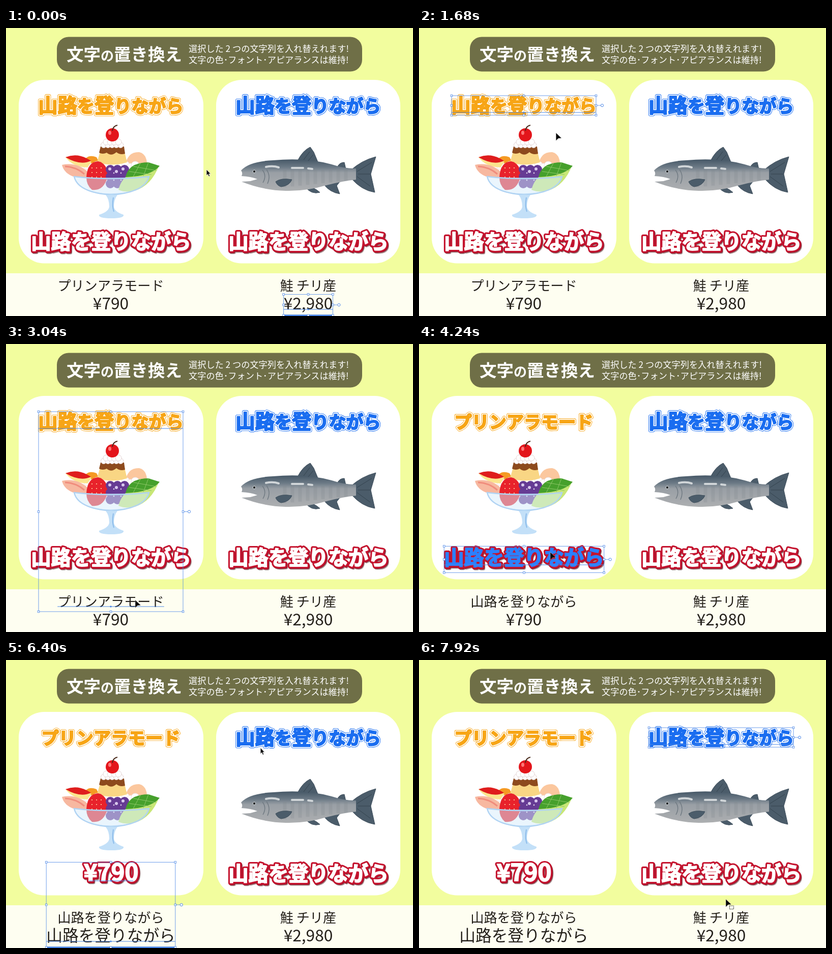
Write an HTML page that moves like this. It is 800x566 px and loops after 8 s.

```html
<!DOCTYPE html>
<html lang="ja">
<head>
<meta charset="utf-8">
<style>
html, body { margin: 0; width: 100%; height: 100%; overflow: hidden; background: #f2fd9e; }
svg { display: block; width: 800px; height: 566px; font-family: "Noto Sans CJK JP", "Noto Sans CJK", sans-serif; }
text { white-space: pre; }
.mid { text-anchor: middle; }
.head { fill: #fff; font-weight: 700; }
.small { font-size: 17.2px; font-weight: 500; }
.thin { fill: #231f1a; font-weight: 350; }
.fat { font-weight: 900; stroke-linejoin: round; }
.fin { fill: #4b5c6a; stroke: #3f4f5c; stroke-linejoin: round; }
</style>
</head>
<body>
<svg viewBox="0 0 800 566">
  <defs>
    <linearGradient id="fish" x1="0" y1="0" x2="0" y2="1">
      <stop offset="0" stop-color="#465867"/><stop offset=".25" stop-color="#6c7a86"/>
      <stop offset=".42" stop-color="#999fa5"/><stop offset="1" stop-color="#adafb1"/>
    </linearGradient>
    <clipPath id="bowl"><path d="M134 294H281Q274 323 207 328Q141 323 134 294Z"/></clipPath>
  </defs>
  <rect width="800" height="566" fill="#f2fd9e"/>
  <rect y="482" width="800" height="84" fill="#fefef1"/>
  <rect x="100" y="17.5" width="600" height="68" rx="23" fill="#6f6f47"/>
  <g class="head">
    <text x="119" y="64" font-size="33.5">文字<tspan font-size="26">の</tspan>置き換え</text>
    <text class="small" x="359" y="47">選択した 2 つの文字列を入れ替えれます!</text>
    <text class="small" x="359" y="69">文字の色･フォント･アピアランスは維持!</text>
  </g>
  <rect x="25" y="102" width="363" height="360.5" rx="50" fill="#fff"/>
  <rect x="413" y="102" width="362" height="360.5" rx="50" fill="#fff"/>

  <g id="parfait">
    <path d="M236 264Q241 243 262 244Q275 247 277 264L262 272Z" fill="#fbc79e"/>
    <path d="M155 258Q163 248 178 254L184 266L162 269Z" fill="#f59a23"/>
    <g id="cream" fill="#fff" stroke="#eee0e2"></g>
    <path d="M117 254Q146 246 168 263L160 274Q131 273 117 254Z" fill="#fbe58e"/>
    <path d="M117 254Q142 244 167 261Q146 271 117 254Z" fill="#df1d1d"/>
    <path d="M110 269Q139 263 160 282V293H135Q114 286 110 269Z" fill="#f7b8a0"/>
    <path d="M116 272Q138 273 154 287" fill="none" stroke="#f08d7d" stroke-width="3"/>
    <path d="M186 239H232L238 264Q209 273 179 264Z" fill="#f9d684"/>
    <path d="M186 233H232L234 247Q224 250 217 244Q207 253 198 245Q190 249 183 245Z" fill="#8d4a1d"/>
    <g id="swirl" fill="#fff" stroke="#e4d3d4"></g>
    <circle cx="209" cy="210" r="13" fill="#e3151b"/>
    <ellipse cx="204" cy="206" rx="3" ry="4" fill="#f77"/>
    <path d="M209 202Q210 193 219 191" fill="none" stroke="#4a2b1c" stroke-width="2"/>
    <path d="M158 293Q160 263 181 262Q200 266 200 292Q192 321 169 318Q158 309 158 293Z" fill="#e8222b"/>
    <g id="seeds" fill="#ffd5a0"></g>
    <g id="grapes" fill="#663b94"></g>
    <path d="M221 318Q227 294 247 285L301 270Q285 311 252 320Q235 324 221 318Z" fill="#c8e777"/>
    <path d="M235 293Q241 264 280 264L302 271Q286 291 235 293Z" fill="#46a02c"/>
    <path d="M242 282L286 288M250 272L295 280M264 266L250 292M280 264L270 291" stroke="#8cc667"/>
    <g clip-path="url(#bowl)">
      <rect x="130" y="293" width="155" height="40" fill="#d6ebfc" opacity=".5"/>
      <path d="M150 318Q207 333 264 317V330H150Z" fill="#a9d2f5" opacity=".6"/>
    </g>
    <path d="M134 292Q207 300 281 292Q273 323 207 328Q141 323 134 292Z" fill="none" stroke="#b0d3f3" stroke-width="2.5"/>
    <path d="M196 328H219Q212 337 212 351Q213 361 231 367Q233 374 207 374Q181 374 183 367Q202 361 203 351Q203 337 196 328Z" fill="#c3e0f8"/>
    <path d="M211 333Q208 350 212 361" fill="none" stroke="#8bbbea" stroke-width="2"/>
  </g>

  <g id="salmon">
    <g class="fin">
      <path d="M573 261Q583 241 598 234L605 244L615 268Z"/>
      <path d="M652 272Q656 264 665 264L668 277Z"/>
      <path d="M677 280Q699 260 727 253L717 287L725 323Q699 319 679 296Z"/>
      <path d="M588 312Q604 311 617 323Q600 328 588 312Z"/>
      <path d="M625 308L657 301L650 310L656 326Q637 323 625 308Z"/>
    </g>
    <path d="M462 280Q478 262 525 260Q590 254 640 268Q668 277 688 276L688 298Q660 301 630 309Q590 321 550 320Q505 319 463 302L480 301L494 297Q482 292 463 291Q466 285 462 280Z" fill="url(#fish)"/>
    <g id="bands" stroke="#7d858b" stroke-width="7" opacity=".22"></g>
    <path d="M511 273Q525 270 536 274M562 275H584M594 276L602 277" fill="none" stroke="#d0d5d8" stroke-width="4" stroke-linecap="round"/>
    <path d="M504 279Q513 290 505 304M512 278Q521 291 514 306" fill="none" stroke="#717b83" stroke-width="1.5"/>
    <circle cx="488" cy="282" r="2.8" fill="#1d2429" stroke="#d5d8da"/>
    <path class="fin" d="M530 302Q541 294 562 298Q557 310 541 312Q533 310 530 302Z"/>
    <path d="M690 282L719 264M692 287H716M690 292L716 311M585 259L597 243M594 261L604 249" stroke="#34434f"/>
  </g>

  <g id="words"></g>
  <g id="marks" fill="none" stroke="#4b86e6"></g>
  <g id="cursor" stroke-linejoin="round">
    <path id="arrow" d="M0 0V12L2.7 9.5L4.7 14L6.8 13L4.9 8.8H8.4Z" fill="#111" stroke="#fff" stroke-width=".8"/>
    <path id="tip" d="M0 0V15.5L4.6 11L11 10.5Z" fill="#080808" stroke="#fff" stroke-width=".4"/>
    <rect id="dot" x="8" y="14" width="4" height="4" fill="#111"/>
    <rect id="dash" x="7.5" y="13" width="8" height="6.5" fill="none" stroke="#111" stroke-dasharray="1.5 1"/>
  </g>
</svg>
<script>
const $ = id => document.getElementById(id);
const many = (n, f) => Array.from({ length: n }, (_, i) => f(i)).join('');
const ball = (x, y, r, more = '') => `<circle cx="${x}" cy="${y}" r="${r}" ${more}/>`;
const grid = (x, y, step, r) => many(9, i => ball(x + i % 3 * step, y + (i / 3 | 0) * step, r));

$('cream').innerHTML = many(11, i => ball(160 + i * 9.4, 270 + i % 2 * 4, 8));
$('swirl').innerHTML = many(5, i => ball(192 + i * 8.3, 230, 5.5)) + many(4, i => ball(197 + i * 8, 224, 6));
$('seeds').innerHTML = grid(169, 275, 9, 1.1);
$('grapes').innerHTML = grid(205, 278, 14, 9) + many(3, i => ball(204 + i * 13, 277 + i % 2 * 5, 3, 'fill="#d8c7ed"'));
$('bands').innerHTML = many(9, i => `<path d="M${548 + i * 15} 279V${313 - i * 1.6}"/>`);

const label = (s, x, y, size, more) => `<text x="${x}" y="${y}" font-size="${size}" ${more}>${s}</text>`;
const layer = (s, x, y, size, color, width) =>
  label(s, x, y, size, `class="fat mid" fill="${color}" stroke="${color}" stroke-width="${width}"`);

function title(s, { x, y, size, color }) {
  const mixed = s.replace(/[一-龠]+/g, k => `<tspan font-size="${size * 1.08}">${k}</tspan>`);
  return [[color, 7.5], ['#fff', 5.8], [color, 2.2]].map(([c, w]) => layer(mixed, x, y, size * .96, c, w)).join('');
}
function sign(s, { x, y, size }, hot) {
  const fit = s[0] === '¥' ? size * 1.16 : size;
  return layer(s, x + 2.5, y + 2.5, fit, '#a58c8c', 7) + layer(s, x + 1, y + 1, fit, '#930f26', 8) +
    layer(s, x, y, fit, '#c5142f', 8) + layer(s, x, y, fit, hot ? '#2b80ff' : '#fff', 1.8);
}
const plain = (s, { x, y, size }) => label(s, x, y, size, 'class="thin mid"');

// Four text objects per card; drop is the depth of the box below the baseline.
const column = (x, color, name, price) => [
  { x, y: 166, size: 35.5, drop: .15, draw: title, color, text: '山路を登りながら' },
  { x: x + .5, y: 434, size: 39.3, drop: .39, draw: sign, text: '山路を登りながら' },
  { x, y: 516, size: 26.2, drop: .38, draw: plain, text: name },
  { x, y: 553, size: 31.7, drop: .37, draw: plain, text: price }
];
const left = column(206, '#f7a516', 'プリンアラモード', '¥790');
const right = column(594, '#1a6df0', '鮭 チリ産', '¥2,980');
const items = [...left, ...right];
const [head, banner, name, price] = left;

const clicks = [[0, right[3]], [1360, head], [2400, head, name], [4080, banner], [5040, banner, price], [6880, right[0]]];
const swaps = [[3360, head, name], [5680, banner, price]];
// Arrival time and place of each pointer stop.
const stops = [[0, 394, 278], [1040, 272, 151], [2160, 254, 503], [4000, 258, 409], [4960, 212, 538], [6480, 513, 156], [7760, 603, 470]];
const TRAVEL = 640, HOVER = 160;

function textOf(item, t) {
  const swap = swaps.find(([at, ...pair]) => t >= at && pair.includes(item));
  return swap ? swap.slice(1).find(other => other !== item).text : item.text;
}
function box(item, t) {
  const em = [...textOf(item, t)].reduce((n, c) => n + (c > '⺀' ? 1 : /[ ,]/.test(c) ? .28 : .555), 0);
  const { x, y, size, drop } = item, half = em * size / 2;
  return { l: x - half, r: x + half, top: y - size * .93, b: y + size * drop };
}
const picked = t => clicks.findLast(([at]) => at <= t).slice(1);

function marks(t) {
  const chosen = picked(t), boxes = chosen.map(item => box(item, t));
  const edge = (side, pick) => pick(...boxes.map(o => o[side]));
  const l = edge('l', Math.min), top = edge('top', Math.min), r = edge('r', Math.max), b = edge('b', Math.max);
  const cx = (l + r) / 2, cy = (top + b) / 2;
  const lines = [...new Set([...chosen, ...picked(t + HOVER)])].map(item => {
    const o = box(item, t);
    return `<path d="M${o.l} ${item.y}H${o.r}"/>` + ball(item.x, item.y, 1.2, 'fill="#4b86e6"');
  });
  const handles = many(9, i => {
    const x = [l, cx, r][i % 3], y = [top, cy, b][i / 3 | 0];
    return i === 4 ? '' : `<rect x="${x - 1.8}" y="${y - 1.8}" width="3.6" height="3.6" fill="#fff" stroke-width=".8"/>`;
  });
  return lines.join('') + `<path d="M${l} ${top}H${r}V${b}H${l}ZM${r} ${cy}h9" stroke-width=".8"/>` +
    (b > 560 ? `<path d="M${l} ${b}H${r}" stroke-width="3"/>` : '') + ball(r + 12, cy, 2.6, 'fill="#fff"') + handles;
}

function pointer(t) {
  const i = stops.findIndex(s => s[0] > t);
  if (i < 0) return stops.at(-1).slice(1);
  const [, x0, y0] = stops[i - 1], [arrive, x1, y1] = stops[i];
  const p = Math.max(0, 1 - (arrive - t) / TRAVEL), e = p * p * (3 - 2 * p);
  return [x0 + (x1 - x0) * e, y0 + (y1 - y0) * e];
}

const cache = {};
function put(id, html) {
  if (cache[id] !== html) $(id).innerHTML = cache[id] = html;
}
const show = (id, on) => $(id).style.display = on ? '' : 'none';

function draw() {
  const t = Math.floor(performance.now() % 8000 / 80) * 80;
  const [x, y] = pointer(t);
  const idle = t < 800 || t >= swaps[1][0] && t < 6480;
  const over = idle ? null : items.find(item => {
    const o = box(item, t);
    return x > o.l && x < o.r && y > o.top && y < o.b;
  });
  put('words', items.map(item => item.draw(textOf(item, t), item, item === over)).join(''));
  put('marks', marks(t));
  $('cursor').setAttribute('transform', `translate(${x} ${y})`);
  show('arrow', idle);
  show('tip', !idle);
  show('dot', over && !picked(t).includes(over));
  show('dash', t >= 7200);
  requestAnimationFrame(draw);
}
draw();
</script>
</body>
</html>
```
